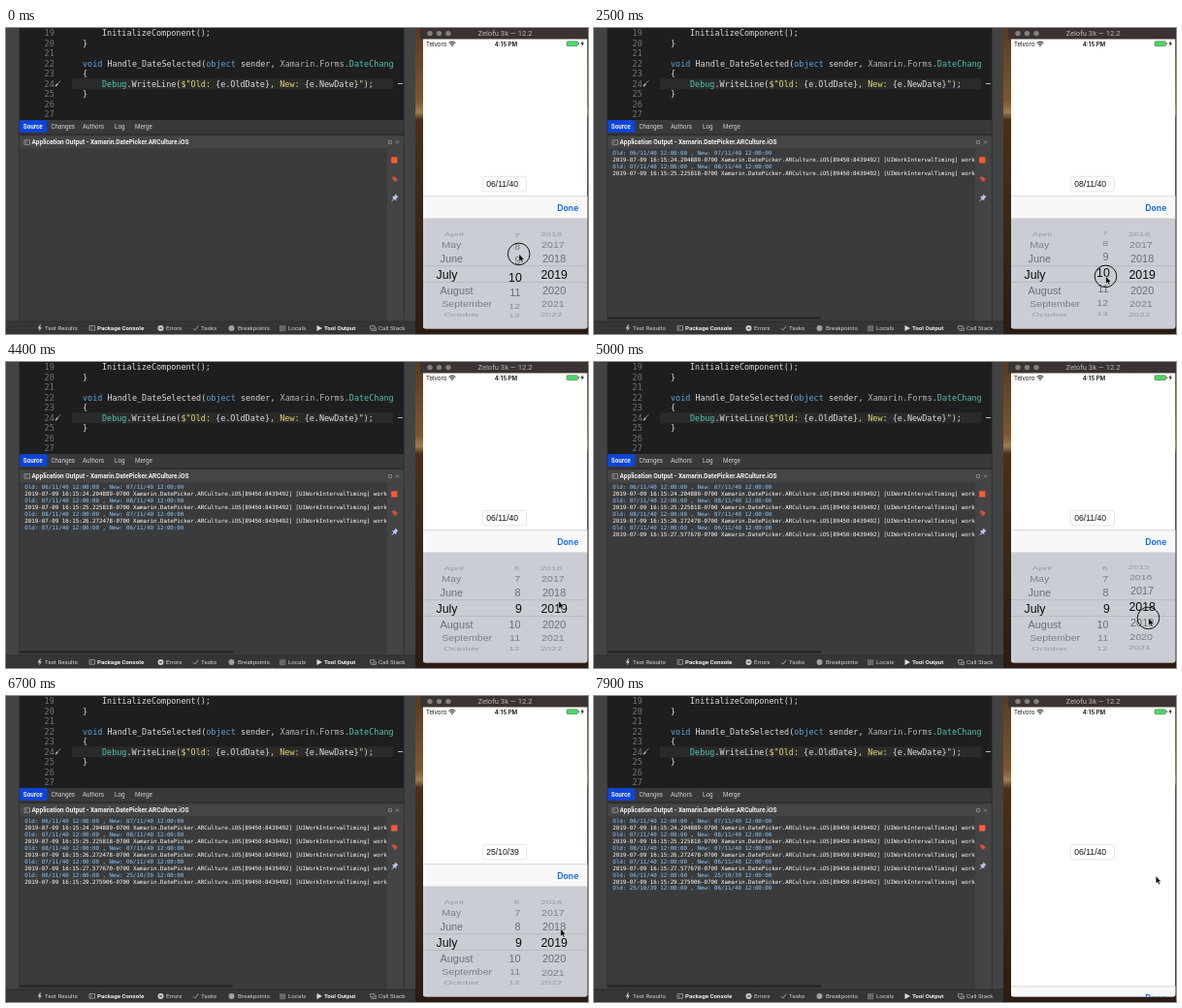
Animation of 600x316 px, one loop 8 s. Source, as an HTML page:

```html
<!DOCTYPE html>
<html lang="en">
<head>
<meta charset="utf-8">
<style>
html, body { margin: 0; width: 600px; height: 316px; overflow: hidden; background: #303030; }
svg { display: block; }
text { white-space: pre; }
.ui { font-family: Roboto, 'Open Sans', sans-serif; }
.mono { font-family: 'DejaVu Sans Mono', monospace; }
.ios { font-family: 'Liberation Sans', Arial, sans-serif; }
.status { font-family: Inter, sans-serif; }
</style>
</head>
<body>
<svg id="stage" width="600" height="316" viewBox="0 0 600 316">
  <defs>
    <linearGradient id="wall" x2="0" y2="1">
      <stop offset="0" stop-color="#5a3a1f"/><stop offset=".24" stop-color="#7d5630"/><stop offset=".275" stop-color="#a07c50"/>
      <stop offset=".3" stop-color="#4a3019"/><stop offset="1" stop-color="#2a1c14"/>
    </linearGradient>
    <clipPath id="codeClip"><rect x="14" y="0" width="385.3" height="95"/></clipPath>
    <clipPath id="logClip"><rect x="14" y="125" width="379" height="175"/></clipPath>
    <clipPath id="screenClip"><rect x="430" y="6" width="169.4" height="304.6" rx="2.4"/></clipPath>
    <clipPath id="lensClip"><rect x="430" y="246" width="170" height="16.5"/></clipPath>
    <clipPath id="rimClip"><path d="M430 209h170v37H430zM430 262.5h170v36.5H430z"/></clipPath>
  </defs>
  <g id="ide"></g>
  <g id="code" class="mono" font-size="8.46" clip-path="url(#codeClip)"></g>
  <g id="log" class="mono" font-size="5.81" clip-path="url(#logClip)"></g>
  <rect id="thumb" x="14" y="298.6" width="220" height="2" rx="1" fill="#232323"/>
  <g id="phone"></g>
  <g clip-path="url(#screenClip)">
    <g id="panel">
      <rect x="430" y="173.5" width="170" height="23.5" fill="#f8f8f8"/>
      <path d="M430 173.7H600M430 196.8H600" stroke="#bdbdc0" stroke-width=".6"/>
      <text x="568.3" y="188.8" class="status" font-size="8.7" font-weight="600" fill="#0a66f5">Done</text>
      <rect x="430" y="197" width="170" height="114" fill="#caced4"/>
      <g id="rim" class="ios" font-size="10.9" clip-path="url(#rimClip)"></g>
      <g id="lens" class="ios" font-size="12.3" clip-path="url(#lensClip)"></g>
      <path d="M430 245.7H600M430 262.5H600" stroke="#b0b3b8" stroke-width=".7"/>
    </g>
  </g>
  <g id="cursor">
    <circle id="press" cy=".4" r="11.3" fill="none" stroke="#111" stroke-width="1"/>
    <path d="M.2 .3V8.3L2 6.7 3.2 9.3 4.6 8.7 3.4 6.2H5.7Z" fill="#000" stroke="#fff" stroke-width=".5"/>
  </g>
</svg>
<script>
const $ = id => document.getElementById(id);
const rect = (x, y, w, h, fill, extra = '') =>
  `<rect x="${x}" y="${y}" width="${w}" height="${h}" fill="${fill}" ${extra}/>`;
const text = (x, y, s, fill, extra = '') => `<text x="${x}" y="${y}" fill="${fill}" ${extra}>${s}</text>`;
const line = (d, stroke, width = 1) => `<path d="${d}" fill="none" stroke="${stroke}" stroke-width="${width}"/>`;
const shape = (d, fill) => `<path d="${d}" fill="${fill}"/>`;
const dot = (x, y, r, fill) => `<circle cx="${x}" cy="${y}" r="${r}" fill="${fill}"/>`;

function drawIde() {
  const label = (x, y, s, bold, size = 6.2) =>
    text(x, y, s, bold ? '#f0f0f0' : '#d2d2d2', `class="ui" font-size="${size}" font-weight="${bold ? 700 : 400}"`);
  let out = rect(0, 0, 600, 316, 'url(#wall)') + rect(0, 0, 422, 316, '#434343')
    + rect(14, 0, 396, 95, '#1e1e1e')
    + rect(68, 52.3, 331, 11, '#2a2a2a') + rect(404, 57, 5, 1, '#bbb')
    + rect(14, 95, 396, 14, '#393939') + rect(13.8, 95.2, 28.5, 12.6, '#0b45dd')
    + rect(14, 109, 396, 2.5, '#303030') + rect(14, 111.5, 396, 13, '#454545')
    + rect(14, 124.5, 396, 178, '#3b3b3b') + rect(393, 124.5, 17, 178, '#444')
    + rect(0, 303, 422, 13, '#353535') + line('M0 303H422', '#292929', .8)
    + line('M13.7 0V303M410.3 0V303', '#2e2e2e', .8);
  const tabs = [[17.8, 'Source', 1], [46.5, 'Changes'], [79, 'Authors'], [112, 'Log'], [133, 'Merge']];
  out += tabs.map(([x, s, b]) => label(x, 103.7, s, b, 6.3)).join('');
  out += label(26.6, 120.4, 'Application Output - Xamarin.DatePicker.ARCulture.iOS', 1, 6.5)
    + line('M19 115.7h5.5v4.6h-5.5zM20.2 117l1.2 1-1.2 1', '#bbb', .6)
    + line('M394.5 116.5h3v3h-3zM402 116.5l3 3m0-3l-3 3', '#aaa', .6);
  out += rect(397.2, 133.3, 6.2, 6.2, '#ff5b35')
    + shape('M397.4 154.8l2.3-1.8 4 2.9-2.2 3z', '#d9533a') + line('M400.5 153.6l-1.6 2.5M398.5 158.4h5', '#8f4738', .6)
    + shape('M401.2 171.3l3.2 3.2-1 .5-1.2 1.6.2 2-2-1.5-3.3 2.3 2.3-3.3-1.4-1.9 2-.1 1.4-1.6z', '#b9c3f0');
  const pads = [[40, 'Test Results'], [94, 'Package Console', 1], [165, 'Errors'], [201, 'Tasks'],
    [239, 'Breakpoints'], [291, 'Locals'], [328, 'Tool Output', 1], [384, 'Call Stack']];
  out += pads.map(([x, s, b]) => label(x, 312.3, s, b)).join('');
  out += shape('M35 306.5l-2.3 4h2l-.8 3 3-4.3h-2l1.2-2.7z', '#ccc')
    + line('M86 307.6h5.5v4.6H86zM87.2 309l1.2 1-1.2 1', '#ccc', .6)
    + dot(159.5, 310, 3, '#ccc') + line('M158.5 309l2 2m0-2l-2 2', '#353535', .8)
    + line('M193 310.3l1.8 1.8 3.4-4.5', '#ccc', .7) + dot(232.5, 310, 3, '#a0a0a0')
    + line('M282.5 307.7h2v2h-2zm3.2 0h2v2h-2zm-3.2 3h2v2h-2zm3.2 0h2v2h-2z', '#bbb', .5)
    + shape('M320.5 307l5.5 3-5.5 3z', '#ddd')
    + line('M375.5 307.7h4.5v3.2h-4.5zM376.5 312.4h5v-3', '#ccc', .6);
  $('ide').innerHTML = out;
}

function drawCode() {
  const WHITE = '#dcdcdc', BLUE = '#5fa3da', TEAL = '#4fc3b0', YELLOW = '#e3d870', GRAY = '#b4b4b4';
  const spans = list => list.map(([s, c]) => `<tspan fill="${c}">${s}</tspan>`).join('');
  const rows = {
    19: [99, [['InitializeComponent();', WHITE]]],
    20: [79, [['}', WHITE]]],
    22: [79, [['void ', BLUE], ['Handle_DateSelected(', WHITE], ['object ', BLUE], ['sender, ', WHITE],
      ['Xamarin.Forms.', GRAY], ['DateChang', TEAL]]],
    23: [79, [['{', WHITE]]],
    24: [99, [['Debug', TEAL], ['.WriteLine(', WHITE], ['$"Old: ', YELLOW], ['{e.OldDate}', WHITE],
      [', New: ', YELLOW], ['{e.NewDate}', WHITE], ['"', YELLOW], [');', WHITE]]],
    25: [79, [['}', WHITE]]]
  };
  let out = '';
  for (let n = 19; n <= 27; n++) {
    const y = 8 + (n - 19) * 10.55;
    out += text(49.8, y, n, '#747474', 'text-anchor="end"');
    if (rows[n]) out += text(rows[n][0], y, spans(rows[n][1]), WHITE);
  }
  out += line('M51 60.3l2.4-2.8', '#bbb', 1.4) + line('M53.5 57.2l2.8-2.8', '#aaa', .8);
  $('code').innerHTML = out;
}

function drawPhone() {
  const label = (x, s, extra) => text(x, 18.6, s, '#111', `class="status" font-size="6.1" ${extra}`);
  $('phone').innerHTML = rect(427, 0, 173, 11.5, '#3a3332')
    + [437, 446.5, 456].map(x => dot(x, 5.6, 2.7, '#858080')).join('')
    + text(514.5, 8, 'Zelofu 3k — 12.2', '#bdb8b6', 'class="ui" font-size="7.6" text-anchor="middle"')
    + rect(430, 11.5, 169.4, 299.1, '#fff', 'clip-path="url(#screenClip)"')
    + label(433, 'Telvoro', '') + label(515.5, '4:15 PM', 'font-weight="600" text-anchor="middle"')
    + line('M456.6 15.4q3.4-2.8 6.8 0M457.9 16.9q2.1-1.7 4.2 0', '#111', 1) + dot(460, 18.3, .8, '#111')
    + rect(578, 13.7, 11.4, 5, '#4cd964', 'rx="1.2" stroke="#333" stroke-width=".4"') + rect(590, 15.2, .8, 2, '#444')
    + shape('M594.8 13l-2.4 3.5h1.7l-.7 2.8 2.5-3.7h-1.7z', '#111')
    + rect(491.3, 153.3, 45.2, 15.6, '#fff', 'rx="2.6" stroke="#dcdcdc" stroke-width=".7"')
    + text(495.2, 164, '', '#111', 'id="date" class="ios" font-size="8.65"');
}

// Each change: time, new date, stamp of the system line that follows it.
const START = '06/11/40';
const changes = [
  [880, '07/11/40', '24.204889'], [1900, '08/11/40', '25.225818'], [2950, '07/11/40', '26.272478'],
  [4250, '06/11/40', '27.577670'], [5950, '25/10/39', '29.275906'], [7300, '06/11/40']
];
const STAMP_DELAY = 250;

// Wheel positions over time
const dayKeys = [[0, 9.85], [400, 10], [1150, 10], [1400, 10.88], [1700, 11], [2150, 11], [2500, 10.12],
  [2800, 10], [3150, 10], [3450, 9.12], [3600, 9]];
const yearKeys = [[4600, 2019], [5000, 2018.12], [5300, 2018], [6150, 2018], [6500, 2018.88], [6800, 2019]];

// Pointer: time, x, y
const pointerKeys = [[0, 528.7, 233], [300, 528.7, 233], [900, 528.5, 251], [1150, 528.5, 251], [1400, 528, 232],
  [1700, 528, 232], [2150, 527.5, 239], [2500, 527.5, 256], [2700, 527.5, 256], [3050, 527, 239], [3450, 527, 256],
  [3700, 527, 256], [4500, 571.5, 246], [4650, 571.5, 246], [5000, 571.5, 264], [5300, 571.5, 264],
  [5800, 571.5, 258], [6150, 571.5, 258], [6500, 571.5, 240], [6800, 571.5, 240], [7400, 579, 185.5]];
const presses = [[0, 250], [1100, 1600], [2100, 2650], [3100, 3650], [4600, 5250], [6000, 6650], [7450, 7650]];

function at(keys, t, col = 1) {
  const i = keys.findIndex(k => k[0] > t);
  if (i === 0) return keys[0][col];
  if (i < 0) return keys[keys.length - 1][col];
  const a = keys[i - 1], b = keys[i], p = (t - a[0]) / (b[0] - a[0]);
  return a[col] + (b[col] - a[col]) * p * p * (3 - 2 * p);
}

const MONTHS = 'January February March April May June July August September October November December'.split(' ');
const MID_X = 515, MID_Y = 254.5, STEP = Math.PI / 9, RADIUS = 48.2;

function wheel(value, reach, lensX, anchor, name) {
  let rim = '', lens = '';
  const attr = `text-anchor="${anchor}"`;
  for (let i = Math.ceil(value - 3.5); i <= value + 3.5; i++) {
    const d = i - value, c = Math.cos(d * STEP), s = .87 + .138 * c;
    const y = MID_Y + RADIUS * Math.sin(d * STEP);
    rim += text(0, 3.9, name(i), '#15181c',
      `${attr} opacity="${(.02 + .54 * c).toFixed(2)}" transform="translate(${MID_X + reach * s} ${y}) scale(${s} ${c})"`);
    if (Math.abs(d) < 1.2) lens += text(lensX, MID_Y + d * 18.4 + 4.4, name(i), '#0c0c0c', attr);
  }
  return { rim, lens };
}

function drawWheels(t) {
  const columns = [
    wheel(6, -67.5, 443.6, 'start', i => MONTHS[i]),
    wheel(at(dayKeys, t), 15.5, 531.8, 'end', i => i),
    wheel(at(yearKeys, t), 38, 551.5, 'start', i => i)
  ];
  $('rim').innerHTML = columns.map(c => c.rim).join('');
  $('lens').innerHTML = columns.map(c => c.lens).join('');
}

function drawLog(t) {
  let date = START, y = 131.4, out = '';
  const add = (s, fill) => { out += text(19.3, y, s, fill); y += 6.9; };
  for (const [time, next, stamp] of changes) {
    if (t < time) break;
    add(`Old: ${date} 12:00:00 , New: ${next} 12:00:00`, '#8cc8ff');
    date = next;
    if (stamp && t >= time + STAMP_DELAY)
      add(`2019-07-09 16:15:${stamp}-0700 Xamarin.DatePicker.ARCulture.iOS[89450:8439492] [UIWorkIntervalTiming] workInterval`, '#fff');
  }
  $('log').innerHTML = out;
  $('date').textContent = date;
  $('thumb').setAttribute('visibility', t >= changes[0][0] + STAMP_DELAY ? 'visible' : 'hidden');
}

function render(t) {
  drawLog(t);
  drawWheels(t);
  const p = Math.min(1, Math.max(0, (t - 7700) / 300));
  $('panel').setAttribute('transform', `translate(0 ${142 * (1 - (1 - p) ** 2)})`);
  $('cursor').setAttribute('transform', `translate(${at(pointerKeys, t)} ${at(pointerKeys, t, 2)})`);
  $('press').setAttribute('visibility', presses.some(([a, b]) => t >= a && t <= b) ? 'visible' : 'hidden');
}

const LOOP = 8000, TICK = 100;
drawIde();
drawCode();
drawPhone();
const start = performance.now();
let shown = -1;
function frame() {
  const t = Math.floor((performance.now() - start) % LOOP / TICK) * TICK;
  if (t !== shown) render(shown = t);
  requestAnimationFrame(frame);
}
frame();
</script>
</body>
</html>
```
